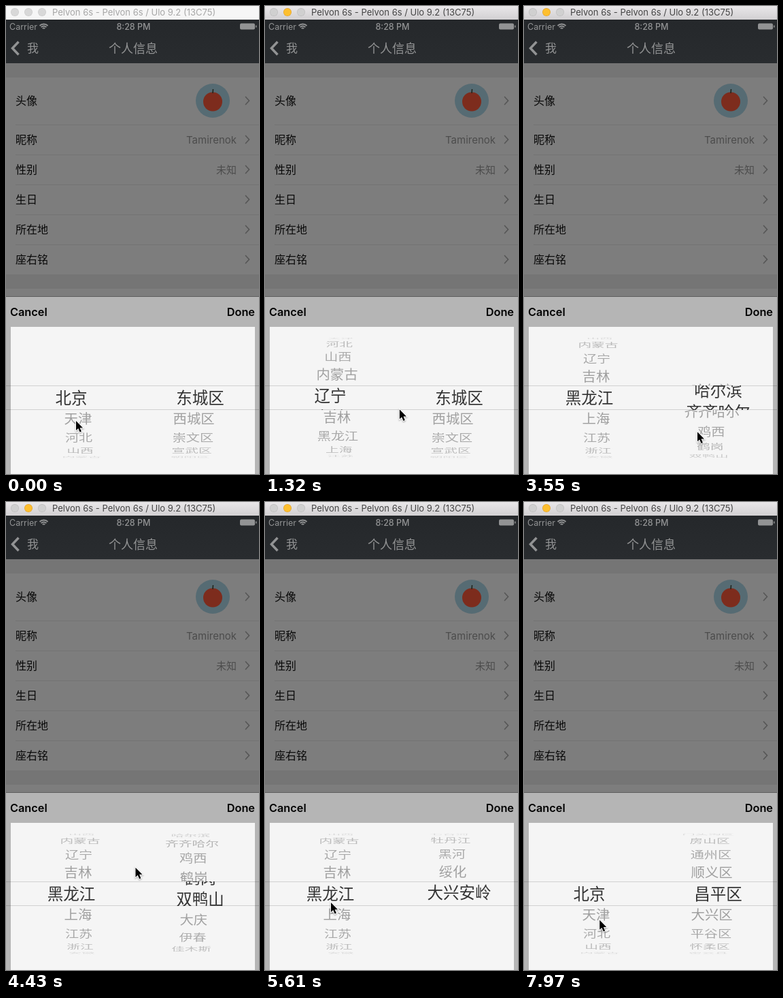
An HTML page with a canvas for the animation above (8 s loop, 372 by 687 pixels).

```html
<!DOCTYPE html>
<html lang="zh-CN">
<head>
<meta charset="utf-8">
<title>个人信息</title>
<style>
  html, body { margin: 0; width: 100%; height: 100%; overflow: hidden; }
  canvas { display: block; }
</style>
</head>
<body>
<canvas id="stage" width="372" height="687"></canvas>
<script>
const ctx = document.getElementById('stage').getContext('2d');
const FAMILY = 'Inter, "Noto Sans CJK SC", "Noto Sans CJK", sans-serif';
const LOOP = 8000;
const FRAME = 147.75;
const PHASE = 138;

const provinces = '北京 天津 河北 山西 内蒙古 辽宁 吉林 黑龙江 上海 江苏 浙江 安徽 福建 江西 山东'.split(' ');
const districts = ('东城区 西城区 崇文区 宣武区 朝阳区 丰台区 石景山区 海淀区 门头沟区 房山区 ' +
  '通州区 顺义区 昌平区 大兴区 平谷区 怀柔区 密云县 延庆县').split(' ');
const cities = '哈尔滨 齐齐哈尔 鸡西 鹤岗 双鸭山 大庆 伊春 佳木斯 七台河 牡丹江 黑河 绥化 大兴安岭'.split(' ');

// Each gesture drags a wheel slowly, then lets it run out to its final row.
const openProvince = { press: 138, release: 729, from: 0, dragged: 2, to: 7, length: 1790 };
const openCity = { press: 3450, release: 4422, from: 0, dragged: 3.72, to: 12, length: 472, bounce: true };
const resetProvince = { press: 5650, release: 6490, from: 7, dragged: 3.2, to: 0, length: 290, bounce: true };

// The screen stalls just before every release.
const stalls = [[430, 720], [3980, 4420], [5895, 6485]];

// Time, x, y of the pointer's turning points.
const pointerPath = [[138, 103, 609], [730, 161.5, 556.5], [1760, 225, 619], [3400, 225, 619], [3550, 258, 626],
  [3980, 250, 545], [4430, 189.5, 536.5], [5500, 97, 588], [5610, 97, 588], [5900, 110, 672],
  [6940, 193.5, 557], [7535, 193.5, 557], [7970, 111, 614]];

const mix = (a, b, u) => a + (b - a) * u;

function screenTime(time) {
  const t = PHASE + Math.floor((time - PHASE) / FRAME) * FRAME;
  const stall = stalls.find(([from, to]) => t > from && t < to);
  return stall ? stall[0] : t;
}

function wheelPosition({ press, release, from, dragged, to, length, bounce }, t) {
  if (t < press) return from;
  if (t < release) return mix(from, dragged, (t - press) / (release - press));
  const u = (t - release) / length;
  const left = bounce ? Math.exp(-2 * u) * Math.cos(u * Math.PI / 2) : Math.max(0, 1 - u) ** 2.4;
  return mix(to, dragged, left);
}

function pointerAt(t) {
  const next = pointerPath.findIndex(stop => stop[0] > t);
  if (next <= 0) return pointerPath.at(next);
  const [a, b] = [pointerPath[next - 1], pointerPath[next]];
  return a.map((value, i) => mix(value, b[i], (t - a[0]) / (b[0] - a[0])));
}

function rect(x, y, w, h, fill) {
  ctx.fillStyle = fill;
  ctx.fillRect(x, y, w, h);
}

function disc(x, y, r, fill) {
  ctx.fillStyle = fill;
  ctx.beginPath();
  ctx.arc(x, y, r, 0, Math.PI * 2);
  ctx.fill();
}

function line(points, color, width) {
  ctx.strokeStyle = color;
  ctx.lineWidth = width;
  ctx.beginPath();
  points.forEach(([x, y]) => ctx.lineTo(x, y));
  ctx.stroke();
}

// y is the optical middle of the glyphs.
function text(str, x, y, size, color, align = 'left', weight = 400) {
  ctx.font = `${weight} ${size}px ${FAMILY}`;
  ctx.textAlign = align;
  ctx.fillStyle = color;
  ctx.fillText(str, x, y + size * .37);
}

function vertical(y0, y1, from, to) {
  const gradient = ctx.createLinearGradient(0, y0, 0, y1);
  gradient.addColorStop(0, from);
  gradient.addColorStop(1, to);
  return gradient;
}

function drawTitleBar(active) {
  const [rim, face] = active ? ['#bdbdbd', '#d0d0d0'] : ['#cbcbcb', '#d8d8d8'];
  rect(0, 0, 372, 20, active ? vertical(0, 20, '#e9e7e9', '#d2d0d2') : '#f6f6f6');
  for (let i = 0; i < 3; i++) {
    const lit = active && i === 1;
    disc(13 + 20 * i, 9, 6, lit ? '#e2a430' : rim);
    disc(13 + 20 * i, 9, 5.3, lit ? '#fdbf2f' : face);
  }
  text('Pelvon 6s - Pelvon 6s / Ulo 9.2 (13C75)', 68, 9.5, 13, active ? '#444' : '#a6a6a6');
}

function drawNavigation() {
  const light = '#929394';
  rect(0, 20, 372, 64, vertical(20, 84, '#25282b', '#292c2f'));
  text('Carrier', 5, 30, 12.5, light);
  for (let r = 2.5; r < 9; r += 3) {
    ctx.strokeStyle = light;
    ctx.lineWidth = 1.8;
    ctx.beginPath();
    ctx.arc(55.5, 35, r, -Math.PI * .75, -Math.PI * .25);
    ctx.stroke();
  }
  text('8:28 PM', 187.5, 30, 12.5, light, 'center', 500);
  ctx.fillStyle = light;
  ctx.beginPath();
  ctx.roundRect(344, 25.5, 22, 9, 2);
  ctx.fill();
  rect(367, 28.5, 1.5, 3, light);
  line([[18.5, 52.5], [9.5, 62], [18.5, 71.5]], light, 3.5);
  text('我', 31, 62, 17, light);
  text('个人信息', 187, 62, 18, light, 'center');
}

function drawAvatar() {
  disc(304, 139, 25, '#566b73');
  disc(304, 140.5, 14, '#7d2c1d');
  line([[304, 128], [304.5, 122]], '#22251c', 1.6);
}

function drawForm() {
  rect(0, 84, 372, 343, '#757575');
  rect(0, 105, 372, 289, '#7d7d7d');
  rect(0, 415, 372, 12, '#7d7d7d');
  const rows = [['头像'], ['昵称', 'Tamirenok'], ['性别', '未知'], ['生日'], ['所在地'], ['座右铭']];
  rows.forEach(([label, value], i) => {
    const y = i ? 152 + 44 * i : 139;
    if (i) rect(14, y - 22, 358, 1, '#737373');
    text(label, 14, y, 16, '#080808');
    if (value) text(value, 339, y, 15, '#4c4c4c', 'right');
    line([[352, y - 6], [357.5, y], [352, y + 6]], '#565656', 1.6);
  });
  drawAvatar();
}

function clipped(y, height, x, middle, scaleX, scaleY, paint) {
  ctx.save();
  ctx.beginPath();
  ctx.rect(7, y, 359, height);
  ctx.clip();
  ctx.translate(x, middle);
  ctx.scale(scaleX, scaleY);
  paint();
  ctx.restore();
}

// A wheel of rows seen from the front, with a flat lens over the chosen one.
function drawWheel(items, position, wheelX, lensX) {
  const STEP = 20.8 * Math.PI / 180, RADIUS = 87.3, MIDDLE = 575, VANISH = 191;
  items.forEach((item, i) => {
    const angle = (i - position) * STEP;
    if (Math.abs(angle) > 1.54) return;
    const depth = Math.cos(angle);
    const y = MIDDLE + RADIUS * Math.sin(angle);
    const shrink = 1 - .075 * (1 - depth);
    const x = mix(VANISH, wheelX, shrink);
    const faded = () => text(item, 0, 0, 20.5, `rgba(0,0,0,${.36 * depth ** .5})`, 'center');
    clipped(471, 86, x, y, shrink, depth, faded);
    clipped(593, 94, x, y, shrink, depth, faded);
    clipped(557, 36, lensX, y, 1, depth, () => text(item, 0, 0, 23.5, '#333', 'center'));
  });
}

function drawSheet(t) {
  rect(0, 426, 372, 1, '#5f5f5f');
  rect(0, 427, 372, 260, '#b5b5b5');
  text('Cancel', 6, 449, 16.3, '#000', 'left', 600);
  text('Done', 366, 449, 16.3, '#000', 'right', 600);
  rect(7, 471, 359, 216, '#f5f5f5');
  drawWheel(provinces, wheelPosition(t < 5650 ? openProvince : resetProvince, t), 105.5, 96);
  const inBeijing = t < 2480 || t > 7370;
  drawWheel(inBeijing ? districts : cities, wheelPosition(openCity, t), 276.5, 285.5);
  rect(0, 557, 372, 1, 'rgba(0,0,0,.15)');
  rect(0, 592, 372, 1, 'rgba(0,0,0,.15)');
}

function drawPointer([, x, y]) {
  ctx.save();
  ctx.translate(x, y);
  ctx.beginPath();
  [[0, 0], [0, 14], [3.2, 11.1], [5.6, 16.6], [7.9, 15.6], [5.6, 10.2], [10, 10.2]]
    .forEach(([px, py]) => ctx.lineTo(px, py));
  ctx.closePath();
  ctx.shadowColor = 'rgba(0,0,0,.35)';
  ctx.shadowBlur = 2;
  ctx.shadowOffsetY = 1;
  ctx.strokeStyle = '#fff';
  ctx.lineWidth = 2;
  ctx.stroke();
  ctx.shadowColor = 'transparent';
  ctx.fillStyle = '#000';
  ctx.fill();
  ctx.restore();
}

function draw(time) {
  const t = screenTime(time);
  drawTitleBar(time >= 160);
  drawNavigation();
  drawForm();
  drawSheet(t);
  drawPointer(pointerAt(t));
}

const start = performance.now();
function tick() {
  draw((performance.now() - start) % LOOP);
  requestAnimationFrame(tick);
}
tick();
</script>
</body>
</html>
```
